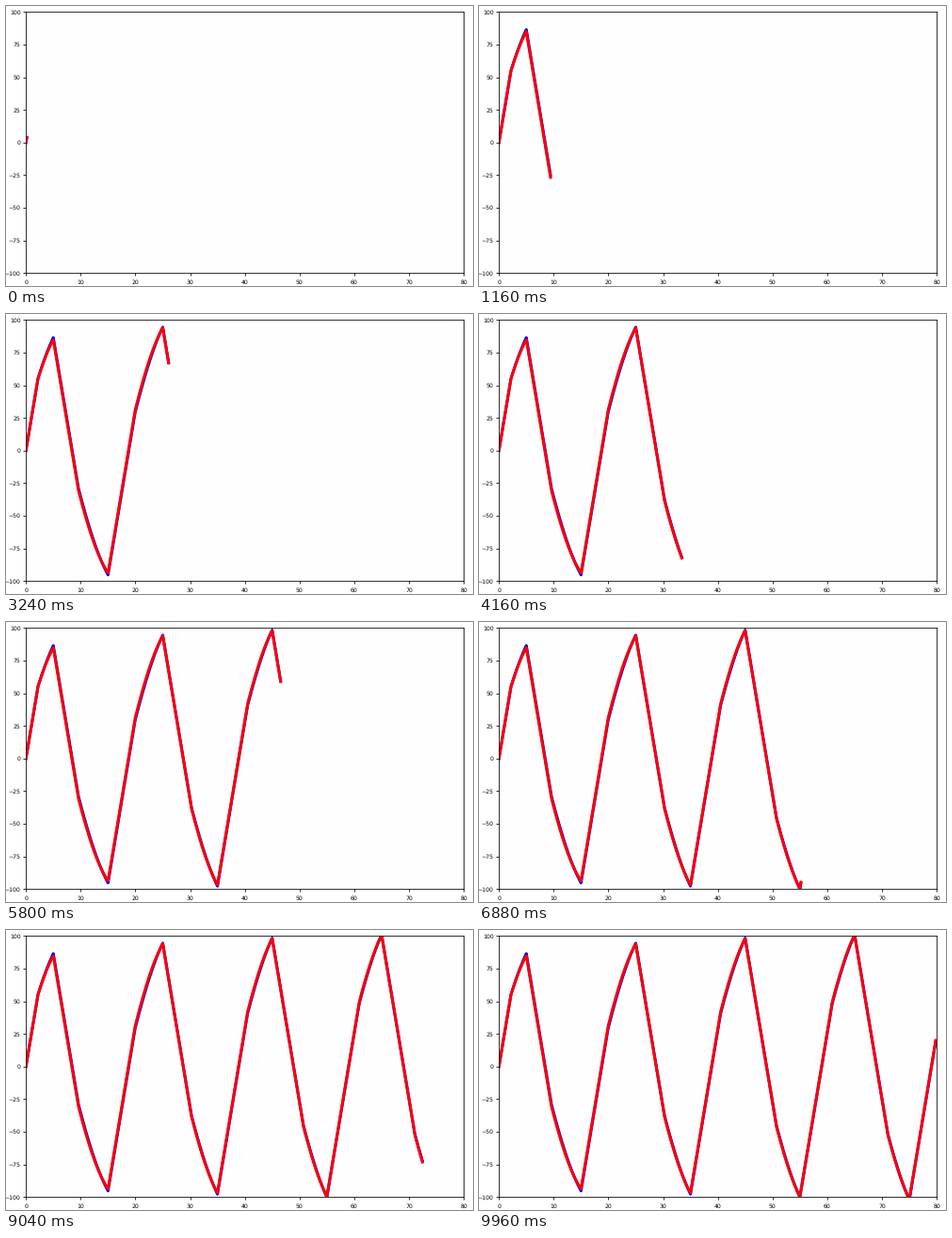
A matplotlib script for the animation above (10000 ms loop, 496 px wide and 297 px high).

```python
import numpy as np
import matplotlib.pyplot as plt
from matplotlib.animation import FuncAnimation

plt.rcParams["text.hinting"] = "none"

W, H, DPI = 496, 297, 64
PX = 72 / DPI  # points per pixel
FRAMES, INTERVAL = 250, 40
SAMPLES, DT = 8000, 0.01
FIRST, PER_FRAME = 16, 32  # samples drawn at the start, added per frame


def cyclic_stress(limit, rate, stiffness=25.2, radius=54.5, gain=46, speed=0.04):
    """Stress under a triangle-wave strain: elastic until yield, then hardening.

    The back stress tends to `limit` at `rate`; the yield radius grows by up to `gain`.
    """
    stress = back = 0.0
    final_radius = radius + gain
    out = np.zeros(SAMPLES)
    quarter = round(5 / DT)
    for k in range(1, SAMPLES):
        sign = 1 if (k - 1 + quarter) // (2 * quarter) % 2 == 0 else -1
        trial = stress + sign * stiffness * DT
        if sign * (trial - back) < radius:
            stress = trial
        else:
            kinematic = rate * (limit - sign * back)
            isotropic = speed * (final_radius - radius)
            dp = stiffness * DT / (stiffness + kinematic + isotropic)
            back += sign * kinematic * dp
            radius += isotropic * dp
            stress = back + sign * radius
        out[k] = stress
    return out


t = np.arange(SAMPLES) * DT
blue_y = cyclic_stress(limit=50.5, rate=0.55)
red_y = cyclic_stress(limit=42, rate=0.65)

fig = plt.figure(figsize=(W / DPI, H / DPI), dpi=DPI, facecolor="white")
left, right, top, bottom = 21.2, 486.1, 6.3, 283.3
ax = fig.add_axes([left / W, 1 - bottom / H, (right - left) / W, (bottom - top) / H],
                  facecolor="#fefdff")
ax.set_xlim(0, 80)
ax.set_ylim(-100, 100)
ax.set_xticks(range(0, 81, 10))
ax.set_yticks(range(-100, 101, 25))
ax.tick_params(length=2.6 * PX, width=0.8 * PX, labelsize=6.1 * PX,
               labelfontfamily="DejaVu Sans")
ax.tick_params(axis="x", pad=4.2 * PX)
ax.tick_params(axis="y", pad=3 * PX)
for spine in ax.spines.values():
    spine.set_linewidth(0.8 * PX)

blue, = ax.plot([], [], color="blue", lw=3 * PX)
red, = ax.plot([], [], color="red", lw=3 * PX)


def draw(i):
    n = FIRST + PER_FRAME * i
    blue.set_data(t[:n], blue_y[:n])
    red.set_data(t[:n], red_y[:n])
    return blue, red


anim = FuncAnimation(fig, draw, frames=FRAMES, interval=INTERVAL,
                     init_func=lambda: draw(0), repeat=True, repeat_delay=0)
plt.show()
```
